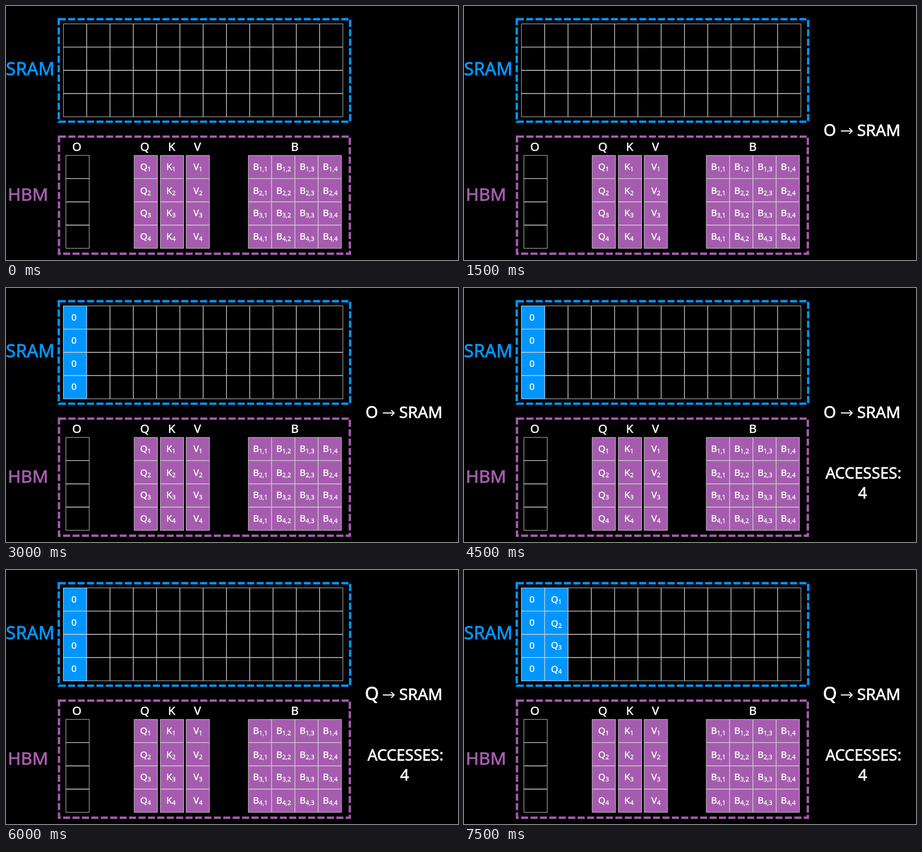
Animation, 998 px wide and 561 px high, one loop 8000 ms. Source, as an HTML page with a canvas:

```html
<!DOCTYPE html>
<html lang="en">
<head>
<meta charset="utf-8">
<title>Memory transfer</title>
<style>
html, body { margin: 0; width: 100%; height: 100%; overflow: hidden; background: #000; }
canvas { display: block; }
</style>
</head>
<body>
<canvas id="stage" width="998" height="561"></canvas>
<script>
const ctx = document.getElementById('stage').getContext('2d');
const BLUE = '#0096ff', PURPLE = '#a55cae', WHITE = '#fff', LINE = '#d0d0d0';
const COL = 51.42, ROW = 51.3, LOOP = 8000;
const ROW_BASE = [362, 415, 463.5, 516];

// A thin outline gives the text its medium weight.
function text(str, x, y, size, color = WHITE, align = 'center') {
  ctx.font = `${size}px "Noto Sans", "Open Sans", sans-serif`;
  ctx.textAlign = align;
  ctx.fillStyle = ctx.strokeStyle = color;
  ctx.lineWidth = size * 0.026;
  ctx.lineJoin = 'miter';
  ctx.miterLimit = 2;
  ctx.fillText(str, x, y);
  ctx.strokeText(str, x, y);
}

function line(x1, y1, x2, y2, width) {
  ctx.lineWidth = width;
  ctx.beginPath();
  ctx.moveTo(x1, y1);
  ctx.lineTo(x2, y2);
  ctx.stroke();
}

// Inner lines are heavier because neighbouring cells share them.
function grid(x, y, cols, rows, fill) {
  const w = cols * COL, h = rows * ROW;
  if (fill) {
    ctx.fillStyle = fill;
    ctx.fillRect(x, y, w, h);
  }
  ctx.strokeStyle = LINE;
  for (let c = 1; c < cols; c++) line(x + c * COL, y, x + c * COL, y + h, 1.6);
  for (let r = 1; r < rows; r++) line(x, y + r * ROW, x + w, y + r * ROW, 1.6);
  ctx.lineWidth = 1.1;
  ctx.strokeRect(x, y, w, h);
}

function dashedBox(x, y, w, h, color) {
  ctx.strokeStyle = color;
  ctx.lineWidth = 5.2;
  ctx.setLineDash([15.6, 5.2]);
  ctx.strokeRect(x, y, w, h);
  ctx.setLineDash([]);
}

function indexed(letter, sub, x, y) {
  text(letter, x, y, 20.5, WHITE, 'left');
  const w = ctx.measureText(letter).width;
  text(sub, x + w, y + 3, 13.7, WHITE, 'left');
}

function column(letter, x) {
  grid(x, 330, 1, 4, PURPLE);
  ROW_BASE.forEach((y, i) => indexed(letter, i + 1, x + (letter === 'V' ? 16 : 13.3), y));
}

function drawSram(t) {
  const x = 126.8, y = 39.5;
  dashedBox(116.5, 29.2, 643.4, 226.3, BLUE);
  text('SRAM', -0.3, 152.5, 39.6, BLUE, 'left');
  grid(x, y, 12, 4);
  if (t >= 3000) {
    grid(x, y, t >= 7500 ? 2 : 1, 4, BLUE);
    for (let r = 0; r < 4; r++) text('0', 150, 71.5 + r * ROW, 20.5);
  }
  if (t >= 7500) ROW_BASE.forEach((base, i) => indexed('Q', i + 1, 192, base - 290.3));
}

function drawHbm() {
  dashedBox(117, 288.5, 642.2, 258.7, PURPLE);
  text('HBM', 4, 429.5, 38.8, PURPLE, 'left');
  [['O', 156.5], ['Q', 306.5], ['K', 365.8], ['V', 422.7], ['B', 637.7]]
    .forEach(([s, x]) => text(s, x, 320, 26));
  grid(132.3, 330, 1, 4);
  column('Q', 283);
  column('K', 340.8);
  column('V', 397.8);
  grid(535, 330, 4, 4, PURPLE);
  ROW_BASE.forEach((y, r) => {
    for (let c = 0; c < 4; c++) indexed('B', `${r + 1},${c + 1}`, 545.3 + c * COL, y);
  });
}

function arrow(x, y) {
  ctx.strokeStyle = WHITE;
  ctx.lineWidth = 2.4;
  ctx.beginPath();
  ctx.moveTo(x, y);
  ctx.lineTo(x + 25, y);
  ctx.moveTo(x + 18.5, y - 6.5);
  ctx.lineTo(x + 25, y);
  ctx.lineTo(x + 18.5, y + 6.5);
  ctx.stroke();
}

function drawNotes(t) {
  if (t >= 1500) {
    if (t < 6000) text('O', 807.5, 286.5, 35.5);
    else text('Q', 808, 286.5, 39.5);
    arrow(832, 276);
    text('SRAM', 868, 286.5, 35.2, WHITE, 'left');
  }
  if (t >= 4500) {
    text('ACCESSES:', 882, 421, 34.3);
    text('4', 880, 465, 34.3);
  }
}

function draw(now) {
  const t = now % LOOP;
  ctx.fillStyle = '#000';
  ctx.fillRect(0, 0, 998, 561);
  drawSram(t);
  drawHbm();
  drawNotes(t);
  requestAnimationFrame(draw);
}
requestAnimationFrame(draw);
</script>
</body>
</html>
```
